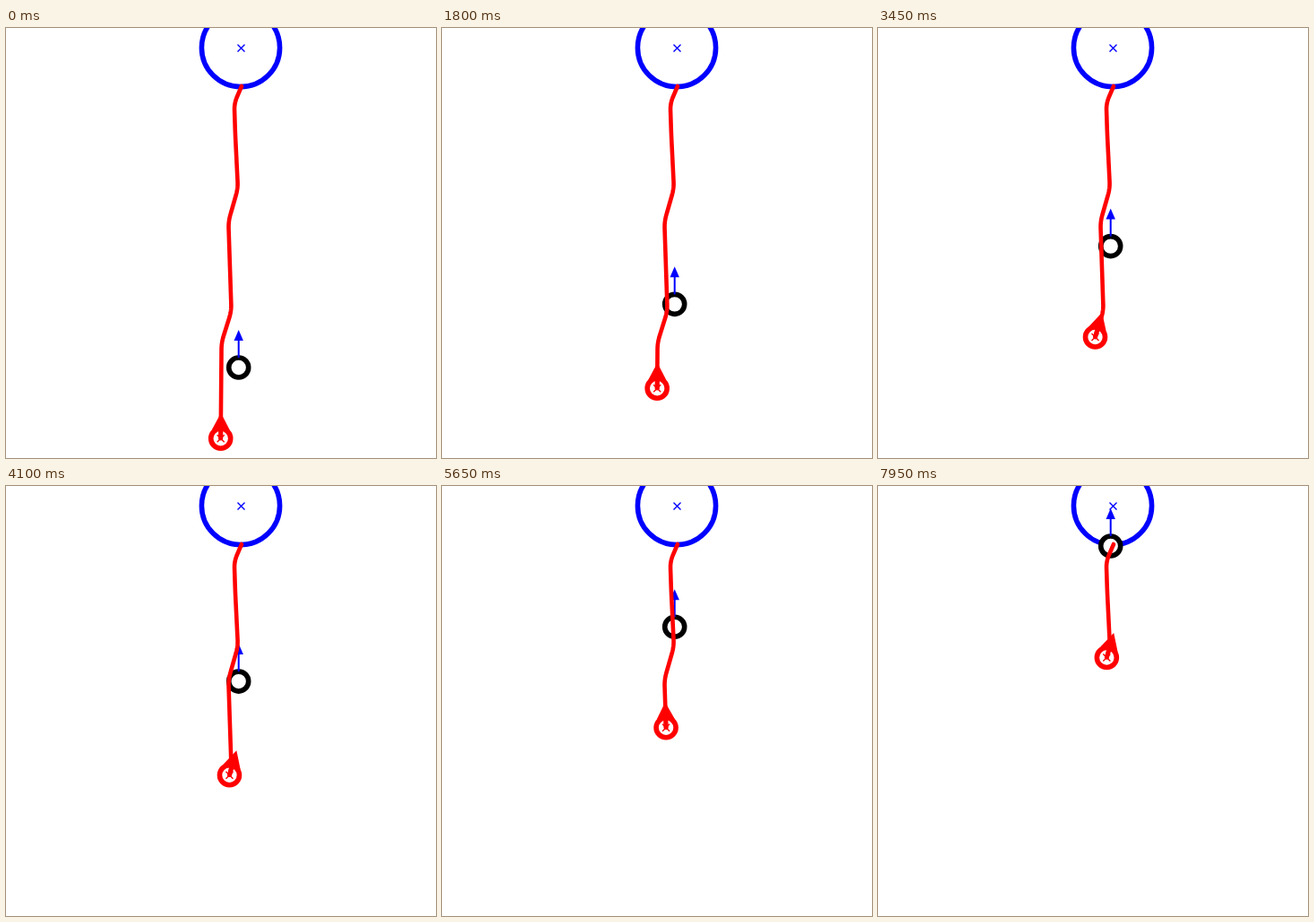
An HTML page that plays this animation: 480x480 px, repeating every 8000 ms.

```html
<!DOCTYPE html>
<html lang="en">
<head>
<meta charset="utf-8">
<title>Path following</title>
<style>
  html, body { margin: 0; width: 100%; height: 100%; overflow: hidden; background: #fff; }
  svg { display: block; width: 100%; height: 100%; }
</style>
</head>
<body>
<svg viewBox="0 0 480 480" fill="none">
  <g stroke="#00f">
    <circle cx="262" cy="22" r="43.6" stroke-width="5.6"/>
    <path d="M258.5 18.5l8 8m0-8l-8 8" stroke-width="1.4"/>
  </g>
  <g id="walker">
    <circle r="11" fill="#fff" stroke="#000" stroke-width="5.6"/>
    <path d="M0-11V-31" stroke="#00f" stroke-width="2"/>
    <path d="M0-42L5.2-30H-5.2Z" fill="#00f"/>
  </g>
  <g stroke="#f00">
    <circle id="ring" r="11" fill="#fff" stroke-width="5.6"/>
    <path id="route" stroke-width="4.6" stroke-linecap="round" stroke-linejoin="round"/>
    <g id="robot">
      <path d="M-4-4l8 8m0-8l-8 8" stroke-width="1.4"/>
      <g id="heading">
        <path d="M0 1V-12" stroke-width="5"/>
        <path d="M0-28.5L10-9.5H-10Z" fill="#f00" stroke="none"/>
      </g>
    </g>
  </g>
</svg>
<script>
const LOOP = 8000, STEP = 50, GOAL_Y = 65, BLUR = 7;
const $ = id => document.getElementById(id);

// Corners of the route [x, y], from the goal downwards.
const corners = [
  [263, 65], [254.8, 84], [255.9, 118], [258.9, 179],
  [248.3, 216], [251.6, 316], [240.6, 351], [239.7, 458]
];

function polyX(y) {
  let i = 0;
  while (i < corners.length - 2 && y > corners[i + 1][1]) i++;
  const [x0, y0] = corners[i], [x1, y1] = corners[i + 1];
  return x0 + (x1 - x0) * (y - y0) / (y1 - y0);
}

// Averaging over a short window rounds the corners.
function routeX(y) {
  let sum = 0;
  for (let k = -BLUR; k <= BLUR; k++) sum += polyX(y + k);
  return sum / (2 * BLUR + 1);
}

// Speeds up from rest, then settles to a steady pace.
function robotY(t) {
  const u = t - 235 * (1 - Math.exp(-t / 235));
  return 458.2 - 0.034 * u - 4.5 * (1 - Math.exp(-u / 1700));
}

function draw(t) {
  $('walker').setAttribute('transform', `translate(259.7 ${379 - 0.03925 * t})`);

  const y = robotY(t), x = routeX(y);
  const angle = Math.atan2(routeX(y + 3) - routeX(y - 3), 6) * -180 / Math.PI;
  const place = `translate(${x} ${y})`;
  $('ring').setAttribute('transform', place);
  $('robot').setAttribute('transform', place);
  $('heading').setAttribute('transform', `rotate(${angle})`);

  let d = `M${x} ${y}`;
  for (let v = Math.floor(y); v > GOAL_Y; v -= 2) d += `L${routeX(v).toFixed(2)} ${v}`;
  $('route').setAttribute('d', d + `L${corners[0][0]} ${GOAL_Y}`);
}

const start = performance.now();
function tick() {
  const t = (performance.now() - start) % LOOP;
  draw(Math.floor(t / STEP) * STEP);
  requestAnimationFrame(tick);
}
tick();
</script>
</body>
</html>
```
